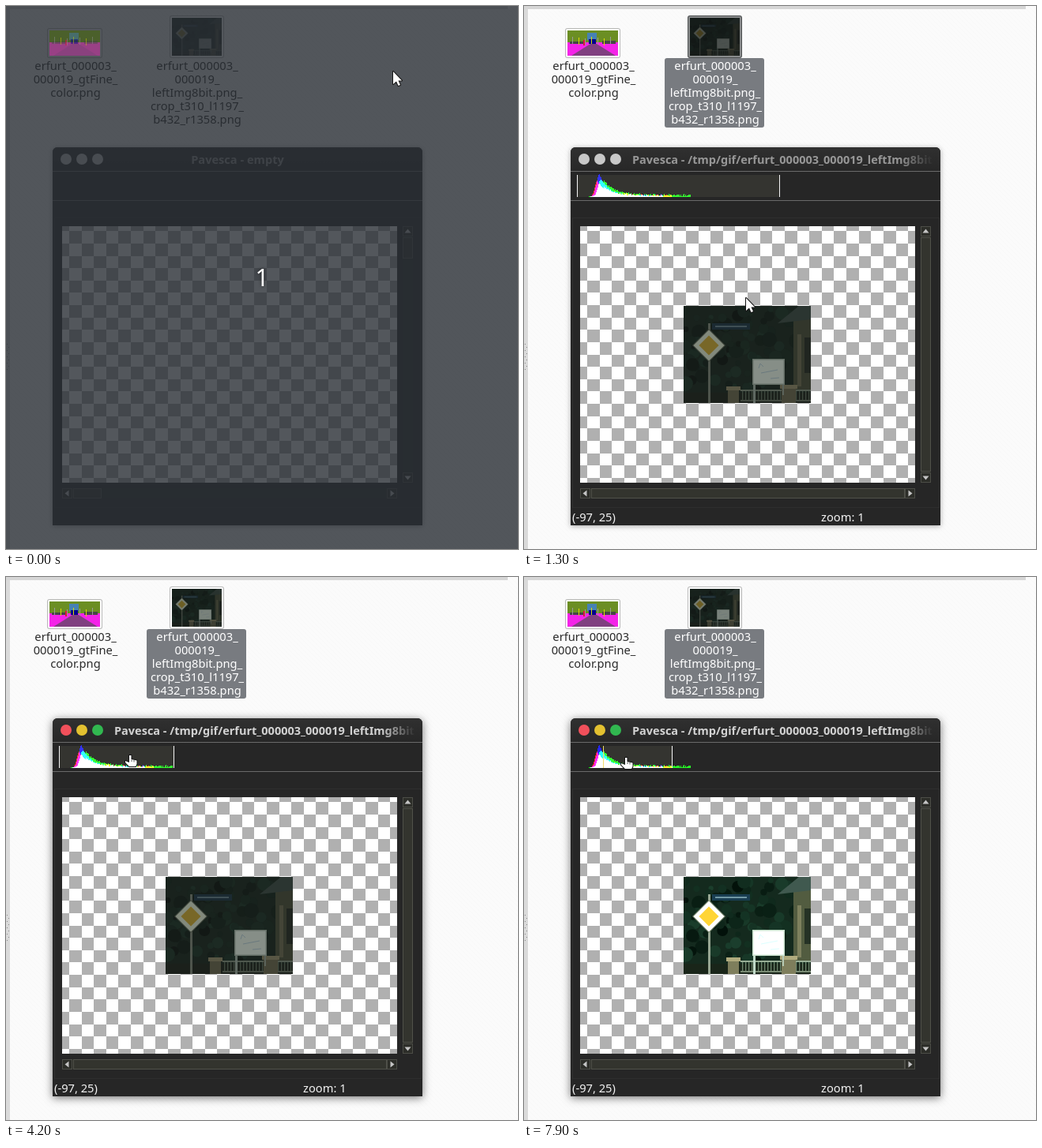
These frames come from a looping animation (648x688 px, 8 s). An HTML page with a canvas:

```html
<!DOCTYPE html>
<html lang="en">
<head>
<meta charset="utf-8">
<title>Image viewer demo</title>
<style>
html, body { margin: 0; width: 100%; height: 100%; overflow: hidden; background: #fbfbfb; }
canvas { display: block; }
</style>
</head>
<body>
<canvas id="stage" width="648" height="688"></canvas>
<script>
const ctx = document.getElementById('stage').getContext('2d');
const LOOP = 8000, STEP = 100;
const APP = 'Pavesca';
const FONT = '"Noto Sans", "Open Sans", sans-serif';
const LABEL_A = ['erfurt_000003_', '000019_gtFine_', 'color.png'];
const LABEL_B = ['erfurt_000003_', '000019_', 'leftImg8bit.png_', 'crop_t310_l1197_', 'b432_r1358.png'];

// time, x, y of the pointer tip, pointer shape
const POINTER = [
  [0, 489, 82, 'arrow'], [100, 470, 78, 'arrow'], [400, 245, 46, 'arrow'],
  [500, 245, 46, 'grab'], [900, 250, 478, 'grab'], [1100, 250, 478, 'arrow'],
  [1600, 325, 206, 'hand'], [1800, 320, 207, 'hand'], [2000, 288, 212, 'hand'],
  [2600, 208, 226, 'arrow'], [3700, 208, 226, 'arrow'], [4200, 157, 225, 'hand'],
  [4300, 157, 225, 'hand'], [4900, 173, 226, 'arrow'], [5100, 173, 226, 'arrow'],
  [5500, 229, 226, 'hand'], [5900, 229, 226, 'hand'], [6400, 187, 227, 'hand'],
  [6600, 147, 229, 'hand'], [6800, 101, 228, 'hand'], [7000, 84, 227, 'hand'],
  [7200, 84, 227, 'hand'], [7600, 102, 227, 'hand'], [7900, 129, 228, 'hand']
];
const LEFT_MARK = [[0, 67], [4300, 67], [4900, 84], [7200, 84], [7600, 100]];
const RIGHT_MARK = [[0, 323], [2000, 323], [2600, 212], [4300, 212], [4900, 228], [5900, 228], [6400, 187]];

function rng(seed) {
  return () => (seed = (seed * 16807) % 2147483647) / 2147483647;
}

function sample(keys, t) {
  let i = 0;
  while (i < keys.length - 1 && keys[i + 1][0] <= t) i++;
  const a = keys[i], b = keys[i + 1] || a;
  const k = b === a ? 0 : (t - a[0]) / (b[0] - a[0]);
  return a.slice(1).map((v, n) => typeof v === 'number' ? v + (b[n + 1] - v) * k : v);
}

function rect(x, y, w, h, fill) {
  ctx.fillStyle = fill;
  ctx.fillRect(x, y, w, h);
}

function frame(x, y, w, h, color) {
  ctx.strokeStyle = color;
  ctx.lineWidth = 1;
  ctx.strokeRect(x + .5, y + .5, w - 1, h - 1);
}

function rounded(x, y, w, h, r, fill) {
  ctx.beginPath();
  ctx.roundRect(x, y, w, h, r);
  ctx.fillStyle = fill;
  ctx.fill();
}

function poly(points, fill) {
  ctx.beginPath();
  points.forEach(([x, y]) => ctx.lineTo(x, y));
  ctx.closePath();
  ctx.fillStyle = fill;
  ctx.fill();
}

function text(str, x, y, fill, size = 14.7, weight = 400, align = 'left') {
  ctx.font = `${weight} ${size}px ${FONT}`;
  ctx.textAlign = align;
  ctx.fillStyle = fill;
  ctx.fillText(str, x, y);
}

// Street view with its levels stretched from lo..hi to the full range
function photo(x, y, w, h, lo, hi) {
  const tone = (...rgb) => `rgb(${rgb.map(v => Math.max(0, Math.min(255, Math.round((v - lo) / (hi - lo) * 255)))).join()})`;
  ctx.save();
  ctx.beginPath();
  ctx.rect(x, y, w, h);
  ctx.clip();
  ctx.translate(x, y);
  ctx.scale(w / 161, h / 123);
  rect(0, 0, 161, 123, tone(25, 34, 29));
  const rand = rng(71);
  for (let i = 0; i < 90; i++) {
    const v = rand() * 14;
    ctx.beginPath();
    ctx.arc(rand() * 145, rand() * 105, 3 + rand() * 7, 0, 7);
    ctx.fillStyle = tone(18 + v * .7, 24 + v * 1.3, 21 + v);
    ctx.fill();
  }
  rect(0, 110, 161, 13, tone(27, 32, 27));
  rect(139, 17, 22, 90, tone(50, 54, 43));
  rect(144, 36, 5, 66, tone(68, 69, 55));
  rect(153, 40, 8, 45, tone(32, 37, 32));
  poly([[119, 22], [146, 0], [161, 0], [161, 17]], tone(43, 53, 49));
  rect(31, 22, 3, 101, tone(78, 84, 76));
  rect(36, 22, 48, 8, tone(27, 42, 50));
  rect(40, 25, 40, 2, tone(62, 78, 83));
  const diamond = (r, fill) => poly([[32, 50 - r], [32 + r, 50], [32, 50 + r], [32 - r, 50]], fill);
  diamond(21, tone(64, 70, 60));
  diamond(19.5, tone(130, 137, 124));
  diamond(12.5, tone(120, 103, 39));
  for (let fx = 74; fx < 161; fx += 4) rect(fx, 106, 1.3, 15, tone(62, 72, 62));
  rect(72, 106, 89, 2, tone(78, 87, 77));
  rect(72, 119, 89, 2, tone(66, 73, 64));
  for (const [px, py, pw] of [[54, 102, 18], [122, 100, 22]]) {
    rect(px + 2, py, pw - 4, 23, tone(68, 68, 54));
    rect(px, py, pw, 5, tone(88, 86, 68));
  }
  rect(88, 99, 3, 24, tone(95, 105, 98));
  rect(125, 99, 2, 14, tone(90, 98, 90));
  rect(87, 67, 41, 33, tone(98, 108, 100));
  rect(88.5, 68.5, 38, 30, tone(134, 142, 135));
  ctx.lineWidth = 1;
  ctx.strokeStyle = tone(106, 121, 126);
  ctx.beginPath();
  ctx.moveTo(95, 79); ctx.lineTo(97, 73); ctx.lineTo(101, 77);
  ctx.moveTo(98, 85); ctx.lineTo(119, 81);
  ctx.moveTo(110, 92); ctx.lineTo(121, 91);
  ctx.stroke();
  ctx.restore();
}

function segmentation(x, y) {
  ctx.save();
  ctx.translate(x, y);
  rect(0, 0, 64, 32, '#6b8e23');
  rect(25, 3, 12, 9, '#4682b4');
  rect(0, 15, 64, 17, '#f423e8');
  poly([[29, 17], [37, 17], [61, 32], [5, 32]], '#804080');
  rect(3, 14, 18, 3, '#464646');
  rect(44, 13, 17, 4, '#464646');
  rect(27, 11, 9, 6, '#00008e');
  for (let i = 0; i < 7; i++) rect(6 + i * 8, 8 + i % 3, 1, 9, i % 2 ? '#dcdc00' : '#999');
  rect(20, 12, 2, 7, '#dc143c');
  ctx.restore();
}

function card(x, y, w, h, picked) {
  rounded(x, y, w, h, 3, picked ? '#4c4f50' : '#b9b9b9');
  rounded(x + 1, y + 1, w - 2, h - 2, 2, picked ? '#898b8c' : '#fff');
}

function label(lines, x, color) {
  lines.forEach((line, i) => text(line, x, 81 + i * 17, color, 14.7, 400, 'center'));
}

function cropFile(picked, faded) {
  card(207, 12, 69, 54, picked && faded);
  photo(210, 15, 63, 48, 0, 255);
  if (picked) {
    rect(210, 15, 63, 48, faded ? 'rgba(18,22,22,.5)' : 'rgba(18,22,22,.1)');
    rounded(178, 66, 126, 88, 3, '#787b80');
  }
  label(LABEL_B, 242, picked ? '#fff' : '#2a2a2a');
}

function desktop(t) {
  rect(0, 0, 648, 688, '#fbfbfb');
  ctx.strokeStyle = '#f8f8f8';
  ctx.lineWidth = 1;
  ctx.beginPath();
  for (let x = -688; x < 648; x += 6) {
    ctx.moveTo(x, 0);
    ctx.lineTo(x + 688, 688);
  }
  ctx.stroke();
  rect(0, 0, 5, 688, '#dadada');
  rect(0, 0, 635, 4, '#d6d6d6');
  for (let y = 428; y < 462; y += 4) rect(y % 8 ? 1 : 3, y, 1, 1, '#888');
  card(52, 28, 70, 38, false);
  segmentation(55, 31);
  label(LABEL_A, 88, '#2a2a2a');
  cropFile(t >= 400, t < 2800);
}

function checker() {
  const size = 15.625;
  ctx.save();
  ctx.beginPath();
  ctx.rect(71, 279, 424, 325);
  ctx.clip();
  rect(71, 279, 424, 325, '#fff');
  for (let j = -11; j < 11; j++) {
    for (let i = -14; i < 14; i++) {
      if ((i + j) % 2 === 0) continue;
      const x = Math.round(283 + i * size), y = Math.round(441.5 + j * size);
      rect(x, y, Math.round(283 + (i + 1) * size) - x, Math.round(441.5 + (j + 1) * size) - y, '#b0b0b0');
    }
  }
  ctx.restore();
}

// Drawn along x; mirrored on the diagonal for the vertical bar
function scrollbar(x, y, length, thumb, vertical) {
  ctx.save();
  ctx.translate(x, y);
  if (vertical) ctx.transform(0, 1, 1, 0, 0, 0);
  rect(0, 0, length, 13, '#2a2b26');
  rect(14, 0, thumb, 13, '#33342e');
  frame(14, 0, thumb, 13, '#50514a');
  for (const [bx, dir] of [[0, -1], [length - 13, 1]]) {
    rect(bx, 0, 13, 13, '#2c2d28');
    frame(bx, 0, 13, 13, '#4c4d47');
    const c = bx + 6.5;
    poly([[c + 3 * dir, 6.5], [c - 2 * dir, 2.5], [c - 2 * dir, 10.5]], '#c4c4c4');
  }
  ctx.restore();
}

function histogram(t) {
  const [left] = sample(LEFT_MARK, t), [right] = sample(RIGHT_MARK, t);
  const l = Math.round(left), r = Math.round(right);
  rect(l, 214, r - l, 28, '#343430');
  const channels = [
    ['#f00', 92, 20, 4, 13, 187, 5], ['#0f0', 97, 22, 5, 16, 211, 9], ['#00f', 95, 29, 5, 10, 176, 17]
  ];
  ctx.globalCompositeOperation = 'lighter';
  for (const [color, peak, height, rise, fall, end, seed] of channels) {
    const rand = rng(seed * 7919);
    for (let x = 82; x < end; x++) {
      const d = x - peak;
      const body = d < 0 ? height * Math.exp(-((d / rise) ** 2)) : height * Math.exp(-d / fall);
      const tail = x > 100 ? 1 + rand() * 2.6 : rand();
      const h = Math.min(29, Math.round(body + tail));
      rect(x, 242 - h, 1, h, color);
    }
  }
  ctx.globalCompositeOperation = 'source-over';
  const yellow = '#f4dc6a', white = '#f4f4f4';
  rect(l, 214, 1, 28, t >= 5100 ? yellow : white);
  rect(r, 214, 1, 28, t >= 5100 && t < 6000 ? yellow : white);
}

function viewer(t) {
  const loaded = t >= 1100, focused = t >= 2800;
  ctx.save();
  ctx.shadowColor = focused ? 'rgba(0,0,0,.55)' : 'rgba(0,0,0,.35)';
  ctx.shadowBlur = focused ? 11 : 6;
  ctx.shadowOffsetY = focused ? 2 : 1;
  rounded(59, 179, 468, 479, [6, 6, 0, 0], '#262626');
  ctx.restore();
  const bar = ctx.createLinearGradient(0, 179, 0, 209);
  bar.addColorStop(0, '#303030');
  bar.addColorStop(1, '#272727');
  rounded(59, 179, 468, 30, [6, 6, 0, 0], bar);
  rect(59, 209, 468, 1, '#6a6a6a');
  rect(59, 246, 468, 1, '#6a6a6a');
  frame(61, 268, 465, 368, '#2e2e2e');
  ['#f1505b', '#e3c130', '#31b850'].forEach((color, i) => {
    ctx.beginPath();
    ctx.arc(76 + i * 20, 194, 7, 0, 7);
    ctx.fillStyle = focused ? color : '#c8c8c8';
    ctx.fill();
  });

  const ink = focused ? '#d2d2d2' : '#979797';
  if (loaded) {
    ctx.save();
    ctx.beginPath();
    ctx.rect(130, 182, 387, 26);
    ctx.clip();
    const fade = ctx.createLinearGradient(475, 0, 518, 0);
    fade.addColorStop(0, ink);
    fade.addColorStop(1, '#2a2a2a');
    text(`${APP} - /tmp/gif/erfurt_000003_000019_leftImg8bit.png`, 137, 200, fade, 14.5, 700);
    ctx.restore();
    histogram(t);
    text('(-97, 25)', 61, 653, '#f2f2f2');
    text('zoom: 1', 376, 653, '#f2f2f2');
  } else {
    text(`${APP} - empty`, 293, 200, ink, 14.6, 700, 'center');
  }
  checker();
  scrollbar(502, 279, 325, loaded ? 297 : 27, true);
  scrollbar(71, 611, 424, loaded ? 397 : 36, false);
  if (loaded) {
    const levels = t < 5100 ? [0, 255] : t < 7500 ? [17, 161] : [17, 120];
    photo(202, 380, 161, 123, ...levels);
  }
}

function pointer(x, y, kind) {
  ctx.save();
  ctx.translate(Math.round(x), Math.round(y));
  ctx.lineJoin = 'round';
  ctx.lineWidth = 2;
  ctx.strokeStyle = '#151515';
  const outlined = path => {
    const p = new Path2D(path);
    ctx.stroke(p);
    ctx.fillStyle = '#fff';
    ctx.fill(p);
  };
  if (kind === 'arrow') {
    outlined('M1 1V17L5 13.5L7.5 19L10 18L7.5 12.5H12Z');
  } else if (kind === 'hand') {
    outlined('M-1 1H1.5V6L8.5 7.5V12L7 15H-1L-6 10V8L-1 10Z');
    ctx.lineWidth = .7;
    ctx.stroke(new Path2D('M2 6.5V9M5 7V9.5'));
  } else {
    outlined('M-1 -3L1 -5L9 -4L10 1L7 5H0L-3 3V1H-1Z');
    outlined('M10 -1H12V2H15V4H12V7H10V4H7V2H10Z');
  }
  ctx.restore();
}

function draw(t) {
  desktop(t);
  viewer(t);
  const [x, y, kind] = sample(POINTER, t);
  if (kind === 'grab') {
    ctx.save();
    ctx.translate(Math.round(x - 245), Math.round(y - 46));
    cropFile(true, true);
    ctx.restore();
  }
  if (t < 100) {
    rect(0, 0, 648, 688, 'rgba(41,45,52,.8)');
    ctx.globalAlpha = .4;
    segmentation(55, 31);
    ctx.globalAlpha = 1;
    ctx.save();
    ctx.shadowColor = 'rgba(0,0,0,.6)';
    ctx.shadowBlur = 4;
    text('1', 324, 355, '#fff', 30, 400, 'center');
    ctx.restore();
  }
  pointer(x, y, kind);
}

const start = performance.now();
function tick() {
  const t = (performance.now() - start) % LOOP;
  draw(Math.floor(t / STEP) * STEP);
  requestAnimationFrame(tick);
}
tick();
</script>
</body>
</html>
```
